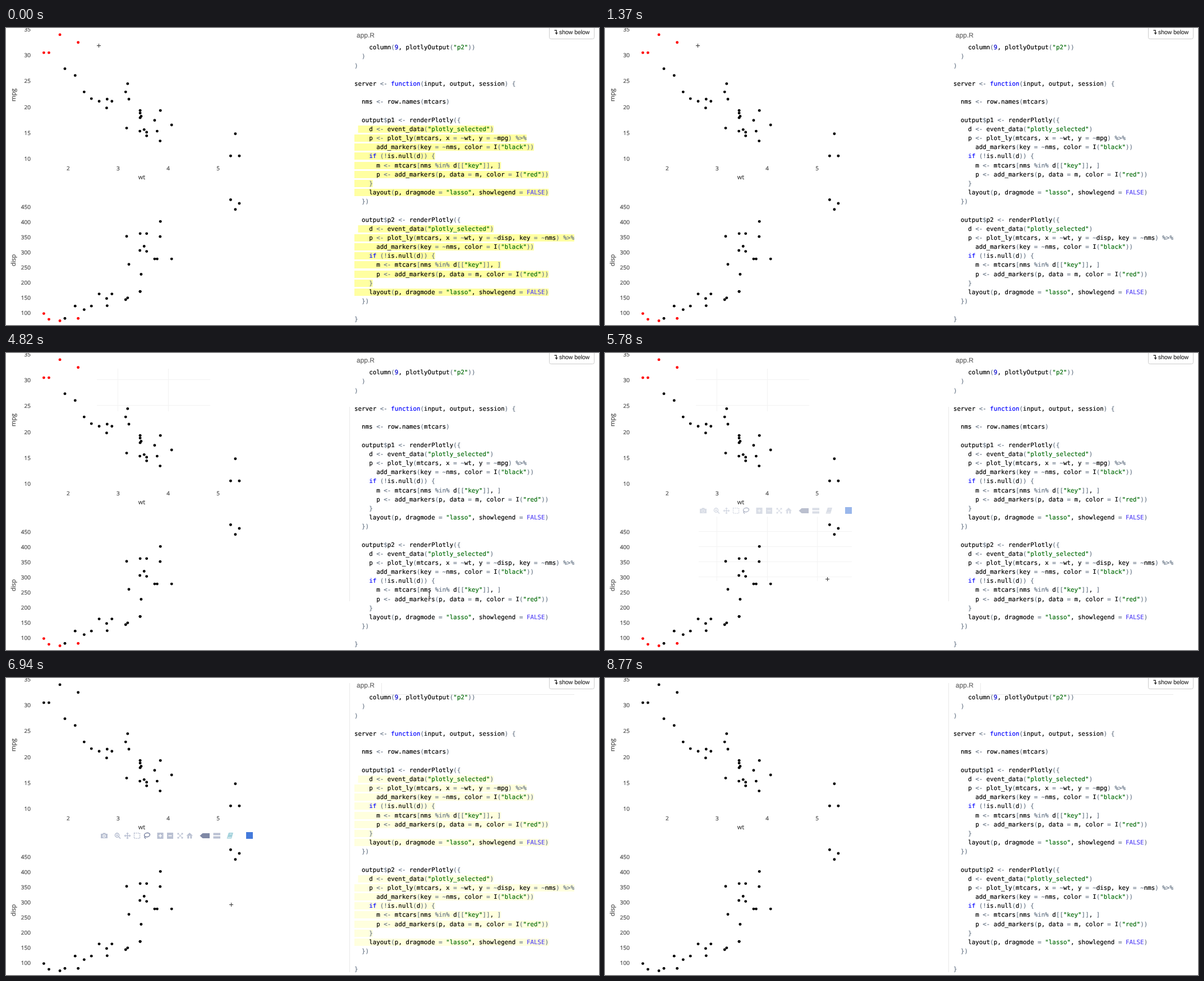
An HTML page with a canvas for the animation above (9.6 s loop, 1057 px wide and 530 px high).

```html
<!DOCTYPE html>
<html lang="en">
<head>
<meta charset="utf-8">
<title>Linked scatter plots</title>
<style>
html, body { margin: 0; width: 100%; height: 100%; overflow: hidden; background: #fff; }
canvas { display: block; }
</style>
</head>
<body>
<canvas id="stage" width="1057" height="530"></canvas>
<script>
const ctx = document.getElementById('stage').getContext('2d');
const LOOP = 9600, STEP = 150;
const MOVE = 3620, RESET = 6230;   // pointer sets off, selection cleared
const SANS = '"Open Sans", sans-serif';
const UI = '"Liberation Sans", Arial, sans-serif';
const MONO = '10.85px "DejaVu Sans Mono", monospace';
const CODE_X = 621, CHAR = 6.532, ROW = 16.17;

// mtcars data set: wt, mpg, disp
const cars = [
  [2.62, 21, 160], [2.875, 21, 160], [2.32, 22.8, 108], [3.215, 21.4, 258],
  [3.44, 18.7, 360], [3.46, 18.1, 225], [3.57, 14.3, 360], [3.19, 24.4, 147],
  [3.15, 22.8, 141], [3.44, 19.2, 168], [3.44, 17.8, 168], [4.07, 16.4, 276],
  [3.73, 17.3, 276], [3.78, 15.2, 276], [5.25, 10.4, 472], [5.424, 10.4, 460],
  [5.345, 14.7, 440], [2.2, 32.4, 79], [1.615, 30.4, 76], [1.835, 33.9, 71],
  [2.465, 21.5, 120], [3.52, 15.5, 318], [3.435, 15.2, 304], [3.84, 13.3, 350],
  [3.845, 19.2, 400], [1.935, 27.3, 79], [2.14, 26, 120], [1.513, 30.4, 95],
  [3.17, 15.8, 351], [2.77, 19.7, 145], [3.57, 15, 301], [2.78, 21.4, 121]
];
const wtX = v => 110.8 + 89.1 * (v - 2);
const mpgY = v => 232 - 9.21 * (v - 10);
const dispY = v => 506.9 - 0.5387 * (v - 100);

const panel = (id, y, key) => [
  `  output$${id} <- renderPlotly({`,
  '    d <- event_data("plotly_selected")',
  `    p <- plot_ly(mtcars, x = ~wt, y = ~${y}${key}) %>%`,
  '      add_markers(key = ~nms, color = I("black"))',
  '    if (!is.null(d)) {',
  '      m <- mtcars[nms %in% d[["key"]], ]',
  '      p <- add_markers(p, data = m, color = I("red"))',
  '    }',
  '    layout(p, dragmode = "lasso", showlegend = FALSE)',
  '  })'
];
const code = [
  '    column(9, plotlyOutput("p2"))', '  )', ')', '',
  'server <- function(input, output, session) {', '',
  '  nms <- row.names(mtcars)', '',
  ...panel('p1', 'mpg', ''), '',
  ...panel('p2', 'disp', ', key = ~nms'), '', '}'
];
const TOKEN = /("[^"]*")|\b(function|if)\b|\b(FALSE)\b|\b(9)\b|(<-|%in%|%>%|[=~$!(){}[\]])|[\w.,]+/g;
const INK = ['#036a07', '#0000ff', '#5848f6', '#0000cd', '#687687'];

// Pointer way points: time, x, y
const path = [
  [MOVE, 360, 100], [3770, 640, 280], [4070, 779, 399], [4670, 843, 438],
  [5420, 396, 403], [6900, 396, 403], [6920, 401, 404], [7560, 430, 444],
  [8620, 1026, 524]
];

const clamp = v => Math.min(1, Math.max(0, v));
const stepped = t => MOVE + Math.floor((t - MOVE) / STEP) * STEP;

// Highlight fades out in four steps
function glow(t) {
  const since = t < RESET ? t : t - RESET;
  return clamp(1 - Math.floor(since / 340) / 4) ** 1.5;
}

function pointer(t) {
  if (t < MOVE) return [165, 31];
  const now = stepped(t);
  const i = path.findIndex(p => p[0] > now);
  if (i < 0) return null;
  const [t0, x0, y0] = path[i - 1], [t1, x1, y1] = path[i];
  const k = (now - t0) / (t1 - t0);
  return [Math.round(x0 + (x1 - x0) * k), Math.round(y0 + (y1 - y0) * k)];
}

function rect(color, x, y, w, h) {
  ctx.fillStyle = color;
  ctx.fillRect(x, y, w, h);
}
// A hairline outline gives the text a slightly heavier weight
function label(str, x, y, font, color, align = 'left') {
  ctx.font = font;
  ctx.fillStyle = ctx.strokeStyle = color;
  ctx.textAlign = align;
  ctx.lineWidth = 0.2;
  ctx.fillText(str, x, y);
  ctx.strokeText(str, x, y);
}
function poly(pts, fill) {
  ctx.beginPath();
  pts.forEach(([x, y]) => ctx.lineTo(x, y));
  if (fill) ctx.fill(); else ctx.stroke();
}
function dot(x, y, r) {
  ctx.beginPath();
  ctx.arc(x, y, r, 0, 7);
  ctx.fill();
}
function turned(x, y, angle, draw) {
  ctx.save();
  ctx.translate(x, y);
  ctx.rotate(angle);
  draw();
  ctx.restore();
}
const sideTitle = (str, y) => turned(16.7, y, -Math.PI / 2,
  () => label(str, 0, 0, '11px ' + SANS, '#444', 'center'));

function grid(x, y, w, h, xs, ys) {
  xs.forEach(v => rect('#f3f3f3', Math.floor(wtX(v)), y, 1, h));
  ys.forEach(v => rect('#f3f3f3', x, Math.floor(v), w, 1));
}

function plots(t) {
  if (t >= MOVE && t < RESET) {
    grid(162, 28, 202, 76, [3, 4], [30, 25].map(mpgY));
    if (t >= 5420) grid(167, 292, 273, 115, [3, 4, 5], [450, 400, 350, 300].map(dispY));
  }
  const tick = '10px ' + SANS;
  for (let v = 10; v <= 35; v += 5) label(v, 44, mpgY(v) + 4.6, tick, '#444', 'right');
  for (let v = 100; v <= 450; v += 50) label(v, 44, dispY(v) + 4.8, tick, '#444', 'right');
  for (let v = 2; v <= 5; v++) label(v, wtX(v), 254, tick, '#444', 'center');
  label('wt', 242, 270.3, '11px ' + SANS, '#444', 'center');
  sideTitle('mpg', 119.5);
  sideTitle('disp', 414.5);
  for (const [wt, mpg, disp] of cars) {
    ctx.fillStyle = t < RESET && mpg > 30 ? '#f00' : '#000';
    dot(wtX(wt), mpgY(mpg), 2.45);
    dot(wtX(wt), dispY(disp), 2.45);
  }
}

function frameLines(t) {
  const line = '#e9e9e9';
  if (t >= RESET) {
    rect(line, 612, 9, 1, 516);
    rect(line, 669, 9, 1, 20);
    rect(line, 669, 29, 344, 1);
  } else if (t >= MOVE + STEP) {
    rect(line, 612, 96, 1, 347);
  }
}

function editor(t) {
  const tint = `rgba(255, 255, 161, ${glow(t)})`;
  frameLines(t);
  label('app.R', 625, 16.7, '12px ' + UI, '#666');
  code.forEach((src, i) => {
    const y = 38.3 + i * ROW;
    const row = (i - 9) % 11;
    if (i > 8 && row < 8) {
      const x = row ? CODE_X : CODE_X + CHAR;
      rect(tint, x, Math.round(y - 9.9), CODE_X + src.length * CHAR - x, 13);
    }
    for (const m of src.matchAll(TOKEN)) {
      const kind = m.slice(1).findIndex(Boolean);
      label(m[0], CODE_X + m.index * CHAR, y, MONO, INK[kind] || '#000');
    }
  });
}

function button() {
  ctx.beginPath();
  ctx.roundRect(968.5, -6.5, 80, 26, 3);
  ctx.fillStyle = '#fff';
  ctx.fill();
  ctx.strokeStyle = '#ccc';
  ctx.lineWidth = 1;
  ctx.stroke();
  label('show below', 986, 11.2, '10.4px ' + UI, '#333');
  ctx.lineWidth = 1.4;
  poly([[977.5, 4.3], [981.2, 4.3], [981.2, 9]]);
  poly([[978.6, 8.3], [983.8, 8.3], [981.2, 12]], true);
}

// Four arrows pointing away from the centre
function arrows(x, y, r, angle) {
  for (let i = 0; i < 4; i++) {
    turned(x, y, angle + i * Math.PI / 2, () => {
      poly([[0, 0], [r - 2, 0]]);
      poly([[r, 0], [r - 2.6, -2.4], [r - 2.6, 2.4]], true);
    });
  }
}

function toolbar(t) {
  const now = stepped(t);
  const alpha = clamp(Math.min((now - 5120) / 1100, (8000 - now) / 600));
  if (!alpha) return;
  const mid = 281.5, soft = '#b9c0d2', firm = '#8089a6';
  const ink = c => { ctx.fillStyle = ctx.strokeStyle = c; };
  ctx.save();
  ctx.globalAlpha = alpha;
  ctx.lineWidth = 1.6;
  // camera
  rect(soft, 169, 278, 12, 8);
  rect(soft, 172.5, 276.5, 5, 2);
  ink('#fff'); dot(175, 282, 2.7);
  ink(soft); dot(175, 282, 1.5);
  // zoom
  ctx.beginPath(); ctx.arc(198, 280.5, 3.6, 0, 7); ctx.stroke();
  poly([[200.6, 283], [204, 286.6]]);
  dot(198, 280.5, 1.5);
  // pan and autoscale
  arrows(216.5, mid, 6, 0);
  ctx.lineWidth = 1;
  arrows(310.5, mid, 7, Math.PI / 4);
  // box select
  ctx.lineWidth = 1.6;
  ctx.setLineDash([2, 1.4]);
  ctx.strokeRect(228.5, 276.8, 10, 9.4);
  ctx.setLineDash([]);
  // lasso
  ink(firm);
  ctx.beginPath(); ctx.ellipse(251.5, 280, 5, 3.5, -0.2, 0, 7); ctx.stroke();
  poly([[248, 282.5], [247, 284.5], [249, 286.8]]);
  // zoom in and out
  for (const x of [275, 292.5]) {
    rect(soft, x - 5.5, mid - 5.5, 11, 11);
    rect('#fff', x - 3, mid - 0.8, 6, 1.6);
  }
  rect('#fff', 274.2, mid - 3, 1.6, 6);
  // home
  ink(soft);
  poly([[321.5, mid], [327.3, 276], [333, mid]], true);
  rect(soft, 323.3, mid, 3, 5);
  rect(soft, 328.3, mid, 3, 5);
  // hover modes
  ink(firm);
  poly([[345.5, mid], [350.5, 277], [363, 277], [363, 286], [350.5, 286]], true);
  rect(soft, 369.5, 276.5, 12.5, 4);
  rect(soft, 369.5, 282.5, 12.5, 4);
  // book
  ink(t >= 6940 ? '#a4d2dc' : soft);
  poly([[397, 276], [405, 276], [402, 286.5], [393.5, 286.5]], true);
  rect('#fff', 398.5, 278, 4, 0.8);
  rect('#fff', 395, 284, 6.5, 0.8);
  rect('#447adb', 428, 275, 12, 12);
  ctx.restore();
}

function cursor(t) {
  const spot = pointer(t);
  if (!spot) return;
  const [x, y] = spot;
  if (x < 450) {
    rect('#333', x - 3, y, 7, 1);
    rect('#333', x, y - 3, 1, 7);
  } else {
    rect('#333', x, y - 4, 1, 9);
    rect('#333', x - 1, y - 4, 3, 1);
    rect('#333', x - 1, y + 4, 3, 1);
  }
}

function draw(t) {
  rect('#fff', 0, 0, 1057, 530);
  plots(t);
  editor(t);
  button();
  toolbar(t);
  cursor(t);
}

ctx.textRendering = 'geometricPrecision';
const start = performance.now();
function tick() {
  draw((performance.now() - start) % LOOP);
  requestAnimationFrame(tick);
}
tick();
</script>
</body>
</html>
```
